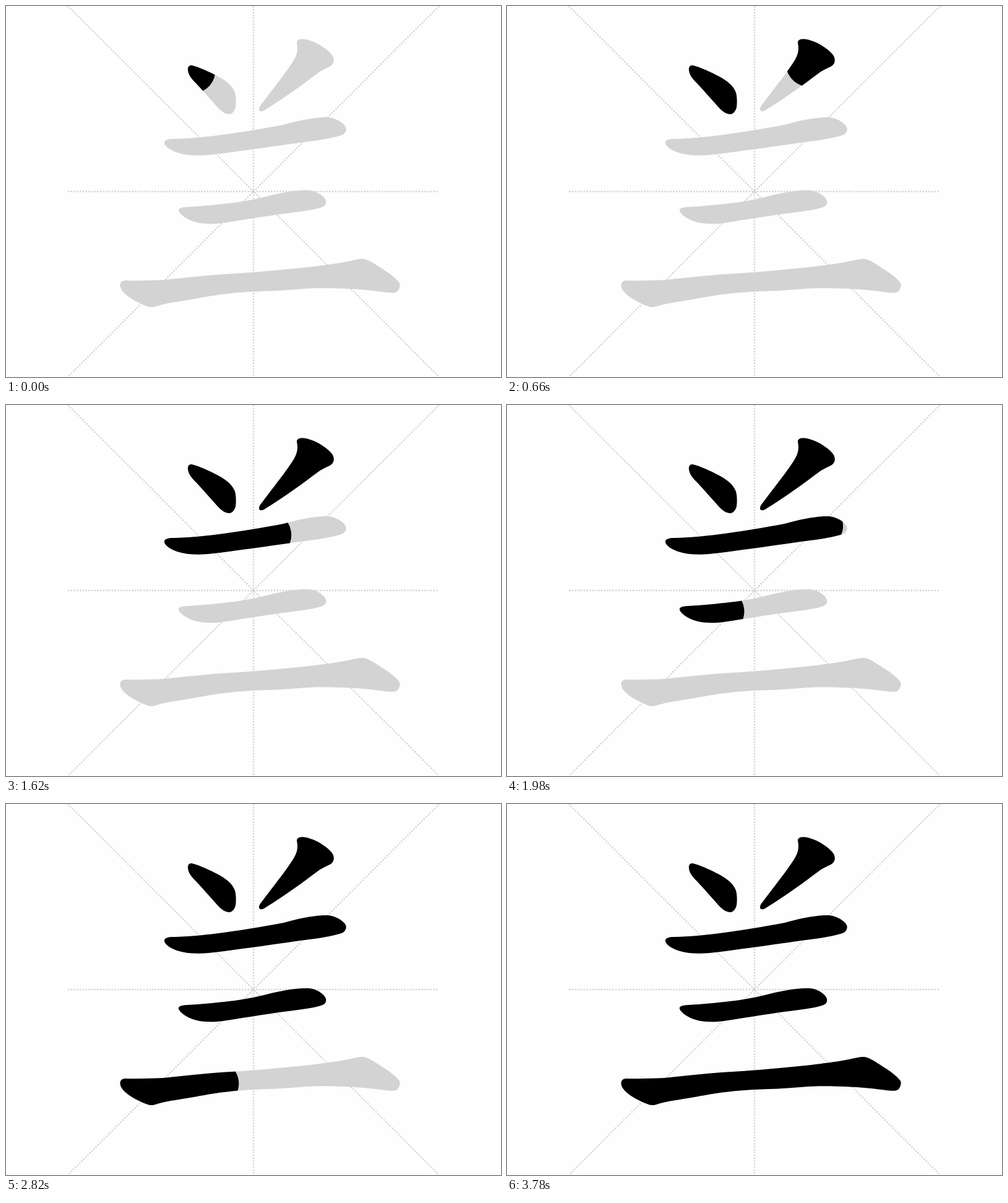
Write an HTML page that moves like this. It is 800 by 600 pixels and loops after 3840 ms.

```html
<!DOCTYPE html>
<html lang="zh">
<head>
<meta charset="utf-8">
<title>Stroke order</title>
<style>
  html, body { margin: 0; width: 100%; height: 100%; overflow: hidden; background: #fefefe; }
  svg { display: block; width: 800px; height: 600px; }
  .grid { stroke: #d3d3d3; stroke-width: 1; stroke-dasharray: 1 1; fill: none; }
  .shape { fill: #d3d3d3; }
  .ink { fill: none; stroke: #000; stroke-width: 75; stroke-linecap: round; stroke-linejoin: round; }
</style>
</head>
<body>
<svg viewBox="0 0 800 600">
  <g class="grid" transform="translate(100) scale(2.34375)">
    <path d="M0 0L256 256"/>
    <path d="M256 0L0 256"/>
    <path d="M128 0V256"/>
    <path d="M0 128H256"/>
  </g>
</svg>
<script>
const LOOP = 3840, STEP = 60;

// start in ms, speed in px per ms, brush centre line, outline
const strokes = [
  { start: 0, speed: 0.125, line: 'M301 104L328 128L361 165',
    shape: 'M294 104C293.5 100 295 96 299 96C305 96 328 106 343 114C356 121 366 129 370 140C372 147 372 158 371 164C369 171 365 175 361 175C355 175 349 171 344 166C334 155 321 140 309 127C302 120 295 113 294 104Z' },
  { start: 421, speed: 0.178, line: 'M476 58L494 82L489 92L470 115L412 168',
    shape: 'M470 59C470 55 474 53 481 53.5C496 55 517 67 526 78C531 84 531 92 526 96C521 100 512 102 502 110C483 124.5 450 148.5 417 169C413 171 409 171 409 167C409 163 412 160 415 156C432 133 455 105 466 86C471 77 472 70 470 59Z' },
  { start: 930, speed: 0.231, line: 'M266 221L300 227L330 224L424 210L515 194L545 198',
    shape: 'M256 222C255 217 261 215 271 215C295 214.5 320 212 340 209.5C375 205 415 198.5 449 192C475 184.5 500 179.5 520 180C533 181 546 189 549 196C551 201 548 207 542 209C530 213 510 216.5 490 219C440 226 390 233 345 239C330 241 315 242 303 241.5C283 241 259 233 256 222Z' },
  { start: 1680, speed: 0.199, line: 'M287 331L320 337L417 325L485 312L512 316',
    shape: 'M279 331C278 327 284 325.5 293 325C315 324 340 321.5 360 319C380 317 400 313 415 309.5C440 303 465 297.5 488 298C502 298.5 515 308 517 315C518 321 515 324 510 325.5C500 329 490 330.5 475 332.5C430 338 390 345 350 351C335 353 317 353 305 349C293 345.5 281 338 279 331Z' },
  { start: 2314, speed: 0.294, line: 'M196 452L204 457L230 470L339 452L462 441L578 433L628 455',
    shape: 'M185 455C183 448 187 444 193 444C215 444.5 235 444 255 443C280 440.5 305 437.5 335 435C370 432.5 400 431 430 428C480 423 525 419 555 412.5C565 410.5 573 408 580 409.5C588 411 600 420 612 427.5C622 434 632 442 636 448C638 453 635 459 632 462C628 464.5 620 464 613 463C595 460.5 575 458 545 457C510 455.5 490 456.5 460 459C430 461.5 400 461 370 464C340 467 325 470 300 474.5C280 478 262 480 246 484.5C240 487 234 488 229 486C212 480 188 467 185 455Z' }
];

const svg = document.querySelector('svg');

function add(parent, tag, attrs) {
  const el = document.createElementNS('http://www.w3.org/2000/svg', tag);
  for (const key in attrs) el.setAttribute(key, attrs[key]);
  return parent.appendChild(el);
}

strokes.forEach((s, i) => {
  const clip = add(svg, 'clipPath', { id: 'clip' + i });
  add(clip, 'path', { d: s.shape });
  add(svg, 'path', { d: s.shape, class: 'shape' });
  s.ink = add(svg, 'path', { d: s.line, class: 'ink', 'clip-path': `url(#clip${i})` });
  s.length = s.ink.getTotalLength();
});

function draw(time) {
  const t = Math.floor(time % LOOP / STEP) * STEP;
  for (const s of strokes) {
    const drawn = Math.min(s.length, Math.max(0.01, (t - s.start) * s.speed));
    s.ink.style.visibility = t < s.start ? 'hidden' : 'visible';
    s.ink.style.strokeDasharray = `${drawn} 2000`;
  }
}

const begin = performance.now();
function tick() {
  draw(performance.now() - begin);
  requestAnimationFrame(tick);
}
tick();
</script>
</body>
</html>
```
